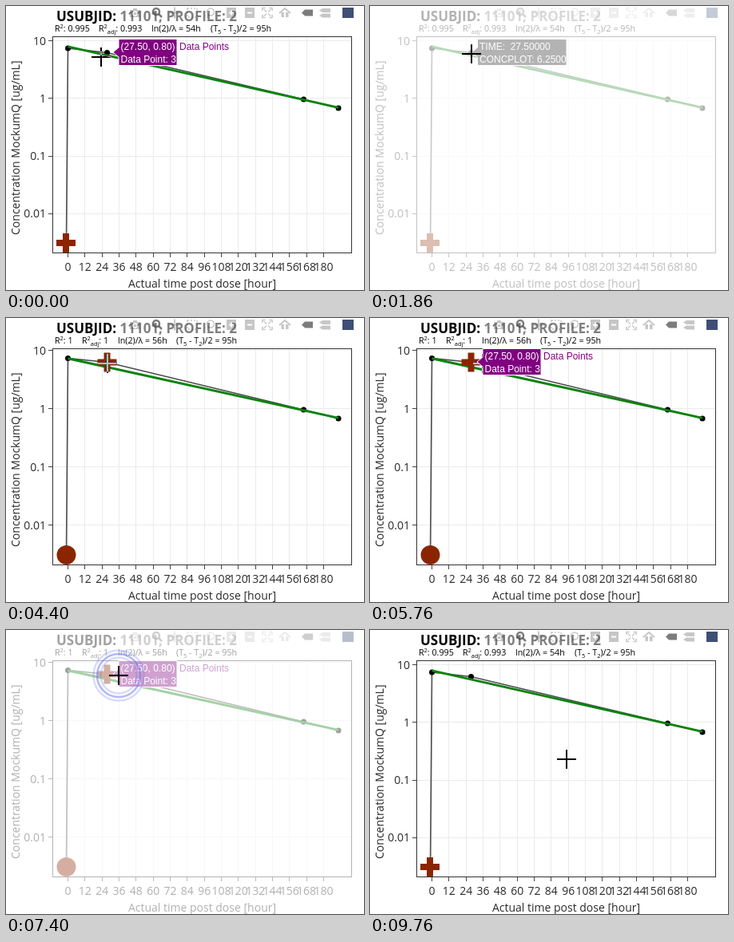
Recreate the animation shown at these times as an HTML page with a canvas. Size 448 by 356 pixels, loop 10000 ms.

```html
<!DOCTYPE html>
<html lang="en">
<head>
<meta charset="utf-8">
<title>Concentration plot</title>
<style>
html, body { margin: 0; width: 100%; height: 100%; overflow: hidden; background: #fff; }
canvas { display: block; }
</style>
</head>
<body>
<canvas id="stage" width="448" height="356"></canvas>
<script>
const ctx = document.getElementById('stage').getContext('2d');
const LOOP = 10000, DIM = 0.3;
const SANS = '"Open Sans", sans-serif';
const HOVER = '12px "Liberation Sans", Arial, sans-serif';
const INK = '#2a2a2a', BROWN = '#8b2500', PURPLE = '#800080', GREEN = '#0a820f';

const FIT_A = {
  tenY: 43.5, decade: 72.3, fitY: [50.9, 127.4], adjusted: '0.993', square: '0.995', half: '54h',
  starts: [61, 116, 182, 256], ys: [53, 58.5, 117, 128], excluded: false
};
const FIT_B = {
  tenY: 40.5, decade: 73, fitY: [50.8, 125.4], adjusted: '1', square: '1', half: '56h',
  starts: [61, 95, 140, 213], ys: [50.5, 55.5, 115, 126], excluded: true
};
const POINT_X = [77.5, 126.5, 372.5, 416];

// Cursor path: time, x, y
const PATH = [
  [0, 119, 64], [1500, 119, 64], [1830, 127, 60], [3930, 127, 60], [4250, 127, 57],
  [5060, 127, 57], [5400, 141, 57], [8060, 141, 57], [8360, 246, 162], [LOOP, 246, 162]
];
const CLICKS = [260, 6230], RING_LIFE = 1570;

const clamp = v => Math.max(0, Math.min(1, v));
const smooth = p => p * p * (3 - 2 * p);
const easeOut = p => 1 - (1 - p) ** 3;

function text(str, x, y, font, color = INK, align = 'left') {
  ctx.font = font;
  ctx.fillStyle = color;
  ctx.textAlign = align;
  ctx.fillText(str, x, y);
}

function line(points, color, width) {
  ctx.beginPath();
  points.forEach(([x, y]) => ctx.lineTo(x, y));
  ctx.strokeStyle = color;
  ctx.lineWidth = width;
  ctx.stroke();
}

function dot(x, y, r, color) {
  ctx.beginPath();
  ctx.arc(x, y, r, 0, 7);
  ctx.fillStyle = color;
  ctx.fill();
}

function circle(x, y, r, color, width) {
  ctx.beginPath();
  ctx.arc(x, y, r, 0, 7);
  ctx.strokeStyle = color;
  ctx.lineWidth = width;
  ctx.stroke();
}

function cross(x, y, arm, thick, color) {
  ctx.beginPath();
  ctx.rect(x - arm, y - thick / 2, arm * 2, thick);
  ctx.rect(x - thick / 2, y - arm, thick, arm * 2);
  ctx.fillStyle = color;
  ctx.fill();
}

// Each run is a string; ^ raises it and _ lowers it
function runs(parts, x) {
  for (const part of parts) {
    const shift = part[0] === '^' ? -4 : part[0] === '_' ? 2.5 : 0;
    const str = shift ? part.slice(1) : part;
    text(str, x, 32 + shift, `${shift ? 7.4 : 10.7}px ${SANS}`, '#000');
    x += ctx.measureText(str).width;
  }
}

function modebar() {
  ctx.fillStyle = 'rgba(255,255,255,.5)';
  ctx.fillRect(144, 0, 292, 22);
  const soft = 'rgba(68,68,68,.3)', strong = 'rgba(68,68,68,.7)';
  const box = (x, y, w, h, c = soft) => { ctx.fillStyle = c; ctx.fillRect(x, y, w, h); };
  const tag = (x, y, w, h, c) => {
    ctx.beginPath();
    ctx.moveTo(x, y + h / 2);
    ctx.lineTo(x + 4, y);
    ctx.lineTo(x + w, y);
    ctx.lineTo(x + w, y + h);
    ctx.lineTo(x + 4, y + h);
    ctx.fillStyle = c;
    ctx.fill();
  };
  box(155, 5, 13, 9);
  box(159, 3, 5, 2);
  circle(161.5, 9.5, 2.5, '#fff', 1.3);
  circle(188, 7, 4, strong, 2.5);
  line([[191, 10], [195, 14]], strong, 2.5);
  cross(211, 8.5, 7, 2, soft);
  ctx.setLineDash([2, 2]);
  ctx.strokeStyle = soft;
  ctx.lineWidth = 1.6;
  ctx.strokeRect(227, 3, 12, 11);
  ctx.setLineDash([]);
  circle(256, 7.5, 4.5, soft, 1.5);
  line([[253, 11], [252, 15]], soft, 1.5);
  for (const x of [276, 299]) {
    box(x, 2, 12, 13);
    box(x + 3, 7.5, 6, 2, '#fff');
  }
  box(281, 5.5, 2, 6, '#fff');
  for (const sx of [-1, 1]) for (const sy of [-1, 1]) {
    line([[327 + sx * 6, 8.5 + sy * 2.5], [327 + sx * 6, 8.5 + sy * 6], [327 + sx * 2.5, 8.5 + sy * 6]], soft, 1.6);
    line([[327 + sx, 8.5 + sy], [327 + sx * 4, 8.5 + sy * 4]], soft, 1.3);
  }
  line([[342, 9], [349, 3], [356, 9]], soft, 2);
  box(344.5, 8, 3.5, 6);
  box(350, 8, 3.5, 6);
  tag(370, 4.5, 14, 8, strong);
  tag(392, 3, 14, 5, soft);
  tag(392, 9.5, 14, 5, soft);
  box(421, 2, 14, 13, '#3f4f75');
}

function plot(fit) {
  ctx.fillStyle = '#fff';
  ctx.fillRect(0, 0, 448, 356);

  for (let i = 0; i <= 15; i++) {
    const x = 77.5 + i * 21.33, gx = Math.floor(x) + 0.5;
    line([[gx, 39], [gx, 309]], '#ebebeb', 1);
    line([[gx, 310], [gx, 315]], '#444', 1);
    text(String(i * 12), x, 332, `14px ${SANS}`, INK, 'center');
  }
  ['10', '1', '0.1', '0.01'].forEach((label, i) => {
    const y = fit.tenY + i * fit.decade, gy = Math.floor(y) + 0.5;
    line([[59, gy], [432, gy]], '#ebebeb', 1);
    line([[53, gy], [58, gy]], '#444', 1);
    text(label, 50, y + 5, `14px ${SANS}`, INK, 'right');
  });
  ctx.strokeStyle = '#333';
  ctx.lineWidth = 1;
  ctx.strokeRect(58.5, 38.5, 374, 271);

  const points = POINT_X.map((x, i) => [x, fit.ys[i]]);
  line([[75.5, 297], ...points], '#4d4d4d', 1.6);
  points.forEach(([x, y], i) => { if (i !== 1 || !fit.excluded) dot(x, y, 3.5, '#000'); });
  line([[77.5, fit.fitY[0]], [416, fit.fitY[1]]], GREEN, 3);
  if (fit.excluded) {
    cross(126.5, 55.5, 12, 8, BROWN);
    dot(75.5, 297, 12, BROWN);
  } else {
    cross(75, 297, 12, 8, BROWN);
  }

  text('Actual time post dose [hour]', 245.5, 353, `14px ${SANS}`, INK, 'center');
  ctx.save();
  ctx.translate(17, 287);
  ctx.rotate(-Math.PI / 2);
  text('Concentration MockumQ [ug/mL]', 0, 0, `14px ${SANS}`);
  ctx.restore();

  text('USUBJID: 11101, PROFILE: 2', 63, 18.5, `bold 17px ${SANS}`, '#000');
  const [a, b, c, d] = fit.starts;
  runs(['R', '^2', ': ' + fit.square], a);
  runs(['R', '^2', '_adj', ': ' + fit.adjusted], b);
  runs(['ln(2)/λ = ' + fit.half], c);
  runs(['(T', '_5', ' - T', '_2', ')/2 = 95h'], d);
  modebar();
}

function tooltip(tipX, x, y, width, color, rows) {
  ctx.beginPath();
  [[tipX, y], [x, y - 6], [x, y - 16.5], [x + width, y - 16.5], [x + width, y + 16.5], [x, y + 16.5], [x, y + 6]]
    .forEach(([px, py]) => ctx.lineTo(px, py));
  ctx.closePath();
  ctx.fillStyle = color;
  ctx.fill();
  ctx.strokeStyle = '#fff';
  ctx.lineWidth = 1;
  ctx.stroke();
  rows.forEach((row, i) => text(row, x + 2.5, y - 3 + i * 16, HOVER, '#fff'));
}

function hover(t, fit) {
  const y = Math.floor(fit.ys[1]);
  if (t < 1700 || (t >= 5260 && t < 8080)) {
    tooltip(134, 141, y, 73, PURPLE, ['(27.50, 0.80)', 'Data Point: 3']);
    text('Data Points', 217, y - 3, HOVER, PURPLE);
  } else if (t < 3930) {
    tooltip(127, 134.5, y, 111.5, '#000', ['TIME:\u00a0 27.50000', 'CONCPLOT: 6.2500']);
  }
}

function plotOpacity(t) {
  const p = start => easeOut(clamp((t - start) / 300));
  return 1 - (1 - DIM) * (p(1290) - p(3930) + p(7240) - p(9000));
}

function cursorAt(t) {
  const i = PATH.findIndex(k => k[0] > t);
  const [t0, x0, y0] = PATH[i - 1], [t1, x1, y1] = PATH[i];
  const p = smooth((t - t0) / (t1 - t0));
  return [Math.round(x0 + (x1 - x0) * p), Math.round(y0 + (y1 - y0) * p)];
}

// Over the live plot the crosshair inverts whatever lies beneath it
function invertingCursor(x, y) {
  ctx.globalCompositeOperation = 'difference';
  cross(x, y, 12, 2, '#fff');
  ctx.globalCompositeOperation = 'source-over';
}

// A strong ring between two pale ones, spreading as it grows
function clickRings(t, x, y) {
  for (const start of CLICKS) {
    const p = (t - start) / RING_LIFE;
    if (p < 0 || p > 1) continue;
    const radius = 8 + 25.5 * p, gap = 0.4 + 5.5 * p, alpha = 0.8 * (1 - p ** 3);
    for (const side of [-1, 1, 0]) {
      const strength = side ? 0.5 : 1;
      circle(x, y, Math.max(0, radius + side * gap), `rgba(90,105,235,${alpha * strength})`, 4 - 2 * p);
    }
  }
}

function draw(t) {
  const fit = t >= 3930 && t < 9000 ? FIT_B : FIT_A;
  const opacity = plotOpacity(t), [x, y] = cursorAt(t);
  const live = opacity > 0.5;
  plot(fit);
  if (live) invertingCursor(x, y);
  hover(t, fit);
  ctx.fillStyle = `rgba(255,255,255,${1 - opacity})`;
  ctx.fillRect(0, 0, 448, 356);
  if (!live) cross(x, y, 12, 2, '#000');
  clickRings(t, x, y);
}

const begin = performance.now();
function tick() {
  draw((performance.now() - begin) % LOOP);
  requestAnimationFrame(tick);
}
tick();
</script>
</body>
</html>
```
